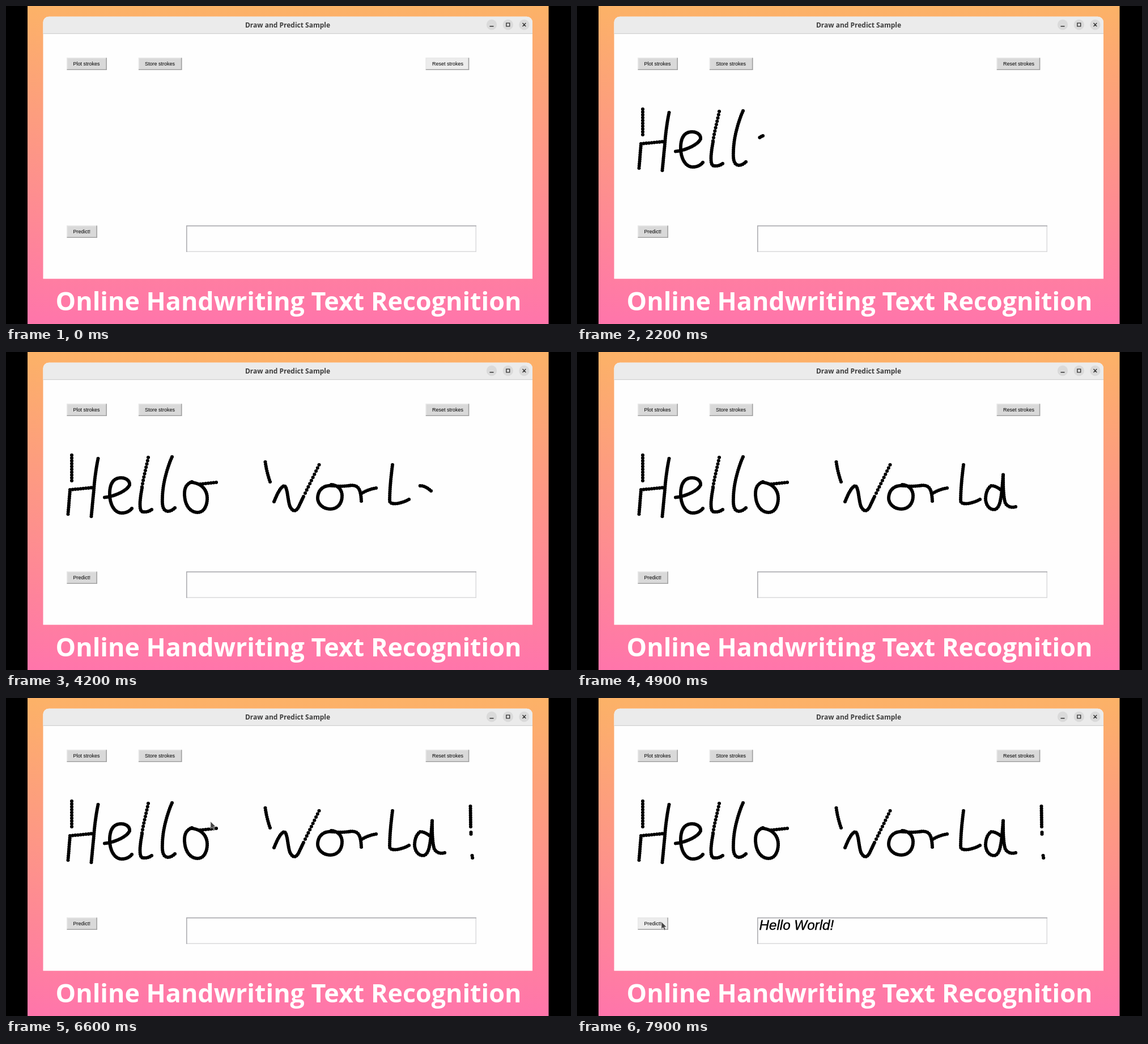
Write an HTML page that moves like this. It is 997 px wide and 561 px high and loops after 8000 ms.

```html
<!DOCTYPE html>
<html lang="en">
<head>
<meta charset="utf-8">
<title>Online Handwriting Text Recognition</title>
<style>
  html, body { margin: 0; width: 100%; height: 100%; overflow: hidden; background: #000; }
  svg { display: block; width: 100vw; height: 100vh; }
  .bold { font-family: "Open Sans", "Noto Sans", sans-serif; font-weight: 700; text-anchor: middle; }
  .ui { font-family: "Liberation Sans", Arial, sans-serif; font-size: 9px; fill: #000; }
  .result { font-family: "Liberation Sans", Arial, sans-serif; font-size: 24.2px; font-style: italic; stroke: #000; stroke-width: .4; }
</style>
</head>
<body>
<svg viewBox="0 0 997 561" preserveAspectRatio="none">
  <defs>
    <linearGradient id="sunset" x1="0" y1="0" x2="0" y2="1">
      <stop offset="0" stop-color="#fcb267"/>
      <stop offset="1" stop-color="#ff75ab"/>
    </linearGradient>
  </defs>
  <rect width="997" height="561" fill="#000"/>
  <rect x="38" width="919.5" height="561" fill="url(#sunset)"/>

  <path d="M65.5 481.3V29a10 10 0 0 1 10-10.3H919a10 10 0 0 1 10 10.3V481.3Z" fill="#fefefe"/>
  <path d="M65.5 48.5V29a10 10 0 0 1 10-10.3H919a10 10 0 0 1 10 10.3V48.5Z" fill="#ebebeb"/>
  <path d="M65.5 48.7H929" stroke="#cfcfcf" stroke-width="1.3"/>
  <text class="bold" x="497" y="38" font-size="12" fill="#3d3d3d">Draw and Predict Sample</text>
  <g fill="#dadada">
    <circle cx="857" cy="33" r="9.2"/>
    <circle cx="885.8" cy="33" r="9.2"/>
    <circle cx="914.4" cy="33" r="9.2"/>
  </g>
  <path d="M853.5 35.7h7M882.9 30.1h5.8v5.8h-5.8zM911.5 30.1l5.8 5.8M917.3 30.1l-5.8 5.8" fill="none" stroke="#333" stroke-width="1.4"/>

  <g id="buttons"></g>

  <rect x="318" y="387" width="512" height="47" fill="#fefefe"/>
  <path d="M829.3 387V433.3H318" fill="none" stroke="#dadadc" stroke-width="1.5"/>
  <path d="M318.8 434V387.8H830" fill="none" stroke="#b0b0b4" stroke-width="1.7"/>
  <text id="result" class="result" x="321.5" y="409">Hello World!</text>

  <path id="ink" fill="none" stroke="#000" stroke-width="6.1" stroke-linecap="round"/>
  <path id="cursor" d="M0 0V12.5L3 9.8L5.2 14.6L7.3 13.6L5.2 9H9Z" fill="#444" stroke="#d8d8d8" stroke-width=".7"/>

  <text class="bold" x="498.5" y="537" font-size="44.8" fill="#fff">Online Handwriting Text Recognition</text>
</svg>
<script>
const LOOP = 8000, STEP = 100;
const NS = "http://www.w3.org/2000/svg";
const byId = id => document.getElementById(id);

function add(parent, tag, attrs, text) {
  const el = document.createElementNS(NS, tag);
  for (const key in attrs) el.setAttribute(key, attrs[key]);
  if (text) el.textContent = text;
  parent.appendChild(el);
  return el;
}

const tint = (face, hover) => face.setAttribute("fill", hover ? "#ececec" : "#d9d9d9");

// Raised button; returns its face so the hover colour can change.
function addButton(x, y, w, label) {
  const g = add(byId("buttons"), "g", { transform: `translate(${x} ${y})` });
  add(g, "rect", { width: w, height: 22, fill: "#e9e9e9" });
  const face = add(g, "rect", { x: 1.5, y: 1.5, width: w - 3, height: 19 });
  add(g, "path", { d: `M${w - .8} .5V21.2H.5`, fill: "none", stroke: "#a0a0a0", "stroke-width": 1.6 });
  add(g, "text", { class: "ui", x: 11.6, y: 14.3 }, label);
  tint(face, false);
  return face;
}

addButton(107, 91, 71, "Plot strokes");
addButton(233.5, 91, 77, "Store strokes");
const reset = addButton(740.3, 91, 77, "Reset strokes");
const predict = addButton(107, 387, 54, "Predict!");

// Pen strokes: start ms, duration ms, dot spacing, path
const strokes = [
  [300, 90, 5, "M116 182V227"],
  [420, 90, 3.8, "M113 243L109.5 286"],
  [560, 160, 4.6, "M113 243L155 239"],
  [810, 190, 3.5, "M162.5 188Q157 215 155 243L150.5 290"],
  [1100, 340, 3, "M174 256.5C190 255 212 246 218 235C219 226 210 222 203 222C190 222 183 232 183 250C183 270 192 284 204 284C212 284 218 281 222 276"],
  [1560, 100, 6, "M251 186C247 205 243 220 240 238"],
  [1660, 130, 3.5, "M240 240C236 262 234 282 242 282Q250 283 257 278"],
  [1860, 230, 3.6, "M293 185C284 205 276 235 276 258C275 275 279 280 285 281Q292 281 298 275"],
  [2180, 370, 3.2, "M328 229C318 233 315 240 315 250C315 270 325 283 338 283C350 283 355 270 355 258C355 245 347 232 328 230"],
  [2550, 110, 4.6, "M343 233L371 230"],
  [2850, 80, 4, "M457.5 194Q460 212 466 229"],
  [2960, 210, 3.3, "M473 264C478 252 484 238 491 236C497 238 497 262 501 272C505 281 511 283 516 274L525 255"],
  [3170, 90, 6.5, "M528 249L552.5 199"],
  [3360, 260, 3, "M576 236C560 234 550 244 550 258C550 268 560 277 572 277C586 277 593 266 593 254C593 242 585 235 574 234"],
  [3620, 140, 3.6, "M576 236Q594 238 610 235C621 236 626 240 627 263"],
  [3760, 70, 3.8, "M628 249Q640 242 653 240"],
  [3890, 190, 3.6, "M682 199C680 215 677 240 677 263C678 268 684 268 692 267Q702 265 711 260"],
  [4150, 470, 3.6, "M750 245C744 240 738 236 731 236C723 241 721 252 721 260C722 272 729 278 736 278C746 277 749 262 752 216C752 235 752 255 756 267C761 274 768 275 774 273"],
  [5010, 120, 4.2, "M819.5 191L820 227"],
  [5130, 30, 3, "M820.5 237V240"],
  [5480, 60, 3, "M822.5 278L823.2 282"]
];

const dots = strokes.flatMap(([start, dur, gap, d]) => {
  const path = document.createElementNS(NS, "path");
  path.setAttribute("d", d);
  const len = path.getTotalLength(), n = Math.max(1, Math.round(len / gap));
  return Array.from({ length: n + 1 }, (_, i) => {
    const p = path.getPointAtLength(len * i / n);
    return { time: start + dur * i / n, mark: `M${p.x.toFixed(1)} ${p.y.toFixed(1)}h.01` };
  });
});

// Pointer: ms, x, y
const route = [[6400, 450, 150], [6600, 361, 218], [7100, 149, 395]];

function pointerAt(t) {
  const last = route.length - 1;
  if (t >= route[last][0]) return route[last].slice(1);
  const i = route.findIndex(stop => stop[0] > t) - 1;
  const [t0, x0, y0] = route[i], [t1, x1, y1] = route[i + 1];
  const k = (t - t0) / (t1 - t0);
  return [x0 + (x1 - x0) * k, y0 + (y1 - y0) * k];
}

const show = (id, on) => byId(id).setAttribute("visibility", on ? "visible" : "hidden");

function draw(t) {
  byId("ink").setAttribute("d", dots.filter(dot => dot.time < t).map(dot => dot.mark).join(""));
  tint(reset, t < 200);
  tint(predict, t >= 7100);
  show("result", t >= 7400);
  const moving = t >= route[0][0];
  show("cursor", moving);
  if (moving) byId("cursor").setAttribute("transform", `translate(${pointerAt(t).join(" ")})`);
}

const began = performance.now();
function tick() {
  const t = (performance.now() - began) % LOOP;
  draw(Math.floor(t / STEP) * STEP);
  requestAnimationFrame(tick);
}
tick();
</script>
</body>
</html>
```
